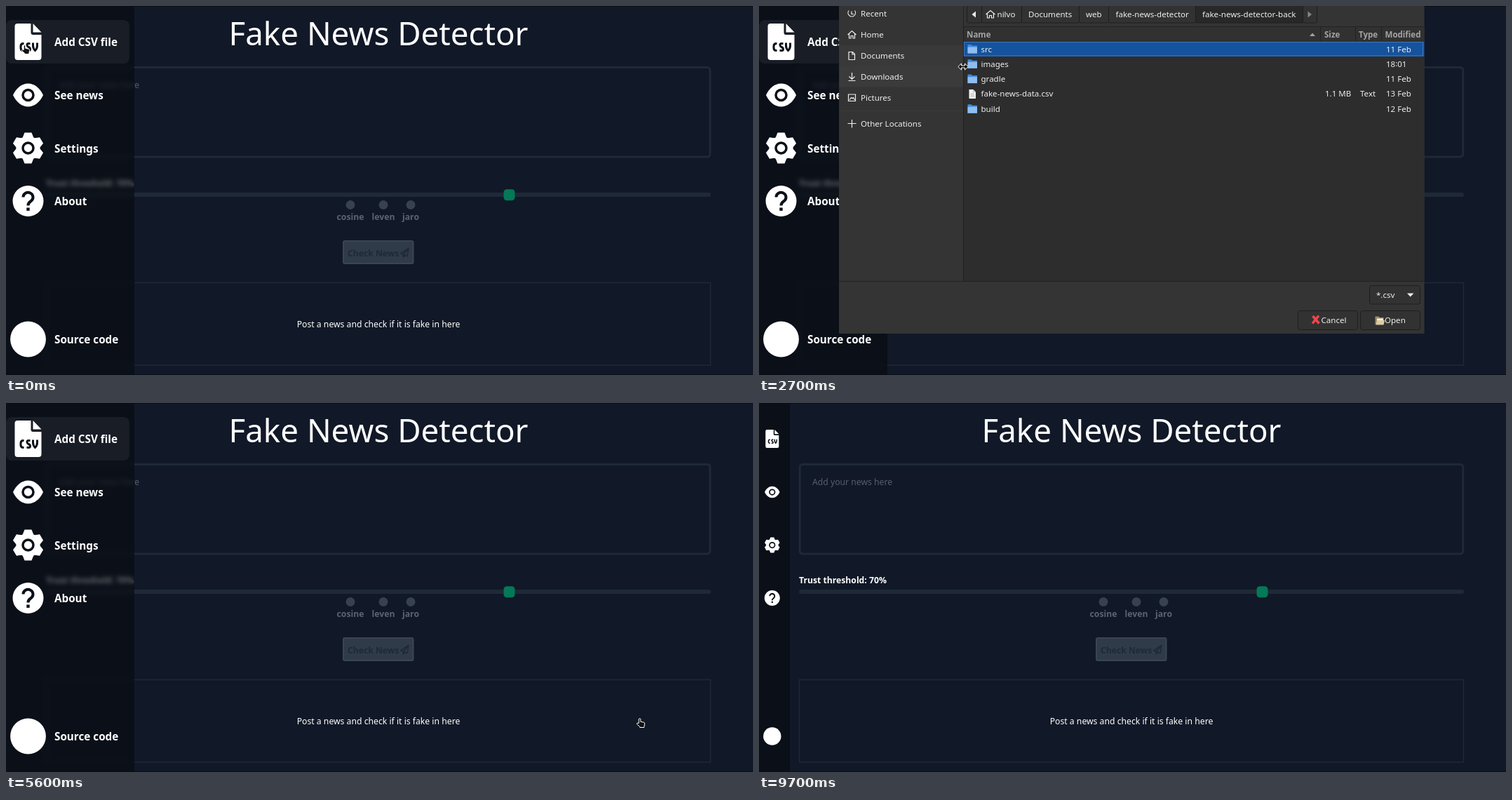
An HTML page that plays this animation: 1065x526 px, repeating every 10000 ms.

```html
<!DOCTYPE html>
<html lang="en">
<head>
<meta charset="utf-8">
<title>Fake News Detector</title>
<style>
html, body { margin: 0; height: 100%; overflow: hidden; background: #111827; }
svg, #bar { position: absolute; left: 0; top: 0; }
#bar { height: 526px; background: rgba(8, 10, 15, .6); backdrop-filter: blur(3px); }
text { font: 12.2px "Noto Sans", sans-serif; fill: #fff; white-space: pre; }
.semi { font-weight: 600; }
.mid { text-anchor: middle; }
#labels text { font-size: 15.25px; font-weight: 600; }
#dialog text { font-size: 11.55px; fill: #eee; }
#dialog .head { font-weight: 700; fill: #a3a3a3; }
.line { fill: none; stroke: #eee; stroke-width: 1.2; }
.hole { fill: none; stroke: #0c1018; stroke-width: 3.5; }
.btn { fill: #323232; stroke: #1e1e1e; }
</style>
</head>
<body>
<svg id="page" width="1065" height="526">
  <text class="mid" x="531" y="56" style="font-size:45.7px">Fake News Detector</text>
  <g fill="none" stroke="#1f2937">
    <rect x="58.2" y="87.5" width="945.6" height="127.5" rx="4" stroke-width="3"/>
    <rect x="57.5" y="394.5" width="947" height="117.5" stroke-width="1.5"/>
  </g>
  <text x="76" y="117" style="fill:#565e6b">Add your news here</text>
  <text class="semi" x="57" y="257">Trust threshold: 70%</text>
  <rect x="57" y="266" width="948" height="6" rx="3" fill="#1f2937"/>
  <rect x="709.5" y="261.3" width="16" height="16" rx="4.5" fill="#047857"/>
  <g id="methods"></g>
  <rect x="481" y="335" width="99.5" height="32" rx="2" fill="#303b4a" stroke="#3a4554" stroke-width="2"/>
  <text class="semi" x="487" y="356.5" style="fill:#1f2937">Check News</text>
  <path d="M562.5 353L574 345.5L572 356.5L566.5 354.5V358L569 355.5M562.5 353L566.5 354.5L574 345.5" fill="none" stroke="#1f2937" stroke-width="1.5" stroke-linejoin="round"/>
  <text class="mid" x="531" y="458">Post a news and check if it is fake in here</text>
</svg>
<div id="bar"></div>
<svg id="top" width="1065" height="526">
  <path d="M0 .5H1065M0 525.5H1065" stroke="#090c14"/>
  <rect id="hover" y="20" width="176" height="62" rx="8" fill="#181d26"/>
  <g id="icons" fill="#fff">
    <g>
      <path d="M-19-22q0-4 4-4H4V-13q0 3 3 3H19V22q0 4-4 4H-15q-4 0-4-4ZM7-26L19-13.5H7Z"/>
      <path class="hole" style="stroke-width:3" d="M-6 2.5h-1q-3.500 0-3.500 4v2q0 4 3.500 4h1M3 2.500H.5q-2 0-2 2t2 3q2.500 1 2.500 3t-2 2H-2M7 1.500v4q0 4 3 7q3-3 3-7v-4"/>
    </g>
    <g>
      <path d="M-21.500 0C-17-10-9-16.500 0-16.500S17-10 21.500 0C17 10 9 16.500 0 16.500S-17 10-21.500 0Z"/>
      <circle class="hole" r="7.5"/>
    </g>
    <g id="gear"><circle r="17"/><circle class="hole" r="7.5"/></g>
    <g>
      <circle r="22"/>
      <path class="hole" d="M-7-5.500a7 6.800 0 1 1 11.500 5.300C1.500 2 0 3 0 6.500" style="stroke-width:4"/>
      <rect x="-2.2" y="9.5" width="4.4" height="4.4" fill="#0c1018"/>
    </g>
    <circle r="25.4"/>
  </g>
  <g id="labels"></g>

  <g id="dialog">
    <rect x="114" width="834.5" height="467" fill="#343434"/>
    <path d="M291.500 0V392M114 392.500H948.500" stroke="#212121"/>
    <path d="M114 149.500H291" stroke="#3b3b3b"/>
    <rect id="docs" x="114.500" y="56" width="176.500" height="30" fill="#393939"/>
    <rect id="downs" x="114.500" y="86" width="176.500" height="29.500" fill="#3b3b3b"/>
    <g id="places"></g>
    <g class="line">
      <path d="M136.500 6.500A5.300 5.300 0 1 1 128 6.500M132 7.500V11.500H135"/>
      <path d="M126.500 41L132.500 35.500L138.500 41M128.500 40V46H131V42.500H134V46H136.500V40"/>
      <path d="M128 65.500H133.500L136.500 68.500V76.500H128ZM133 65.500V69H136.500"/>
      <path d="M132.500 95V104M128.500 100.500L132.500 104.500L136.500 100.500M127.500 106.500H137.500"/>
      <path d="M127.500 126H137.500V135.500H127.500ZM129 134L131.500 130.500L133 132L134.500 130.500L136.500 134"/>
      <path d="M132.500 162V173.500M126.500 167.500H138.500"/>
    </g>
    <g id="crumbs"></g>
    <path d="M309 7.500V16.500L303.500 12Z" fill="#eee"/>
    <path id="next" d="M782.500 7.500V16.500L788 12Z"/>
    <path class="line" d="M323.500 12L330 6.500L336.500 12M325.500 11V17H328.500V13.500H331.500V17H334.500V11"/>

    <g id="empty">
      <rect x="292" y="30" width="633" height="361" fill="#303030"/>
      <rect x="293.500" y="52.500" width="630" height="338" fill="#2d2d2d" stroke="#858585" stroke-dasharray="1 1"/>
    </g>
    <g id="files">
      <rect x="292" y="30" width="656.500" height="362" fill="#2d2d2d"/>
      <rect x="292" y="30" width="656.500" height="21" fill="#313131"/>
      <path d="M292 29.500H948M292 50.500H948M800.500 30V51M850.500 30V51M887.500 30V51" stroke="#212121"/>
      <path d="M785 43L789 38.500L793 43Z" fill="#a3a3a3"/>
      <rect id="chosen" x="292" width="656.500" height="21.300" fill="#15539e"/>
      <rect id="focus" x="292.500" y="51.500" width="654" height="19.500" fill="none" stroke="#6f9bd0" stroke-dasharray="1 1"/>
      <g id="rows"></g>
    </g>

    <rect class="btn" x="870.500" y="398.500" width="72" height="26.500" rx="3"/>
    <rect class="btn" x="768.500" y="434.500" width="85" height="27" rx="3"/>
    <rect class="btn" x="857.500" y="434.500" width="85" height="27" rx="3"/>
    <text x="880" y="416">*.csv</text>
    <path d="M924 409.500H933.500L928.700 414.500Z" fill="#eee"/>
    <path d="M789.500 442L798.500 452.500M798 441.500L789 452.500" stroke="#f0454b" stroke-width="3.500"/>
    <text x="801.500" y="452">Cancel</text>
    <g id="open">
      <path d="M878.500 442.500H883.500L885 444H890.500V454H878.500Z" fill="#9c8a68"/>
      <path d="M881 445.500H890V450H881Z" fill="#f6f2e6"/>
      <path d="M881 448H892L890.500 454.500H879.500Z" fill="#dccba2"/>
    </g>
    <text x="892" y="452">Open</text>
  </g>
  <path id="cursor" fill="#111" stroke="#fff" stroke-linejoin="round"/>
</svg>
<script>
const $ = id => document.getElementById(id);
const text = (x, y, s, attrs = '') => `<text x="${x}" y="${y}" ${attrs}>${s}</text>`;
const show = (id, on) => $(id).style.display = on ? '' : 'none';

const iconY = [51, 127, 202.5, 278, 475];
$('labels').innerHTML = ['Add CSV file', 'See news', 'Settings', 'About', 'Source code']
  .map((s, i) => text(69, iconY[i] + 6, s)).join('');
$('gear').insertAdjacentHTML('afterbegin', [0, 60, 120].map(a =>
  `<path transform="rotate(${a})" d="M-5-22H5L9-12V12L5 22H-5L-9 12V-12Z"/>`).join(''));
$('methods').innerHTML = [['cosine', 491], ['leven', 538], ['jaro', 577]].map(([s, x]) =>
  `<circle cx="${x}" cy="283.500" r="6.500" fill="#374151"/>` +
  text(x, 304.5, s, 'class="semi mid" style="fill:#5b6472"')).join('');
$('places').innerHTML = [['Recent', 15], ['Home', 45], ['Documents', 75], ['Downloads', 105],
  ['Pictures', 135], ['Other Locations', 172]].map(([s, y]) => text(145, y, s)).join('');

const edges = [296.5, 317.5, 374.5, 456.5, 498.5, 622.5, 775.5, 795.5];
$('crumbs').innerHTML = edges.slice(1).map((x, i) =>
  `<rect class="btn" x="${edges[i]}" y="-6" width="${x - edges[i]}" height="30" rx="2" ${i == 5 ? 'style="fill:#282828"' : ''}/>`).join('') +
  [['nilvo', 339.5], ['Documents', 384], ['web', 466], ['fake-news-detector', 508.5], ['fake-news-detector-back', 632]]
    .map(([s, x]) => text(x, 16, s)).join('');

const rowTop = i => 50.7 + i * 21.3;
const folder = '<path d="M0 0H5L6.500 1.500H13.500V12.500H0Z" fill="#3f8ae0"/><path d="M0 3.500H13.500V12.500H0Z" fill="#8fbdf0"/>';
const sheet = '<path d="M2 0H8L11.500 3.500V13H2Z" fill="#f4f4f4"/><path d="M8 0V3.500H11.500M4 6H9.500M4 8H9.500M4 10H9.500" fill="none" stroke="#bbb"/>';
$('rows').innerHTML = [['src', '11 Feb'], ['images', '18∶01'], ['gradle', '11 Feb'],
  ['fake-news-data.csv', '13 Feb'], ['build', '12 Feb']].map(([name, date], i) => {
    const y = rowTop(i) + 14.8;
    return `<g transform="translate(297.500 ${y - 10.5})">${i == 3 ? sheet : folder}</g>` +
      text(316.5, y, name) + text(894, y, date) +
      (i == 3 ? text(807, y, '1.1 MB') + text(857, y, 'Text') : '');
  }).join('') + [['Name', 296], ['Size', 806], ['Type', 855], ['Modified', 892.5]]
    .map(([s, x]) => text(x, 44.5, s, 'class="head"')).join('');

const shapes = {
  arrow: 'M.8 .8V13L3.700 10.300L5.800 15L8 14L6 9.600H9.800Z',
  hand: 'M4.200 7.500V2a1.300 1.300 0 0 1 2.600 0V5.300l4.500.9q1.500.4 1.300 2l-.8 4.300v1H5.700v-1L1.500 8.800q-.5-1.400 1-1.600Z',
  resize: 'M.8 6.500L5.500 2V5H10.500V2L15.200 6.500L10.500 11V8H5.500V11Z'
};
// time, left, top, shape (kept from the step before when absent)
const moves = [
  [0, 21, 55, 'hand'], [500, 33, 55], [700, 37, 55],
  [1800, 64, 52], [1900, 98, 44], [2000, 128, 38, 'arrow'], [2100, 148, 42], [2200, 163, 53],
  [2400, 176, 64], [2500, 210, 76], [2600, 256, 82], [2700, 283, 80, 'resize'],
  [3400, 350, 128, 'arrow'], [3900, 540, 250], [4000, 648, 321], [4300, 760, 375], [4400, 807, 398],
  [4600, 838, 430], [4900, 872, 456], [5000, 896, 458], [5100, 903, 450],
  [5600, 898, 449, 'hand'], [5800, 820, 390, 'arrow'], [5900, 736, 325], [6300, 744, 298], [6400, 752, 282],
  [7800, 430, 160], [7900, 208, 70], [8200, 165, 45], [8300, 142, 31], [9600, 112, 11], [9700, 0, 0, 'none']
];

function draw() {
  const t = performance.now() % 10000;
  const past = moves.filter(m => m[0] <= t);
  const [, x, y] = past.at(-1);
  const shape = past.filter(m => m[3]).at(-1)[3];
  $('cursor').setAttribute('d', shapes[shape] || '');
  $('cursor').setAttribute('transform', `translate(${x} ${y})`);

  const wide = t < 5800;
  $('bar').style.width = (wide ? 183 : t < 5900 ? 150 : t < 6100 ? 106 : 44) + 'px';
  show('hover', wide);
  show('labels', wide);
  [...$('icons').children].forEach((icon, i) =>
    icon.setAttribute('transform', `translate(${wide ? 31.5 : 18.8} ${iconY[i]}) scale(${wide ? 1 : .5})`));

  const loaded = t >= 1800;
  show('dialog', t >= 1500 && t < 5600);
  show('empty', !loaded);
  show('files', loaded);
  show('focus', t < 3600);
  show('docs', t >= 2200 && t < 3400);
  show('downs', t >= 2500 && t < 3400);
  $('chosen').setAttribute('y', rowTop(t < 3600 ? 0 : 3));
  $('next').setAttribute('fill', loaded ? '#888' : '#eee');
  $('open').setAttribute('opacity', loaded ? 1 : .5);
  requestAnimationFrame(draw);
}
draw();
</script>
</body>
</html>
```
